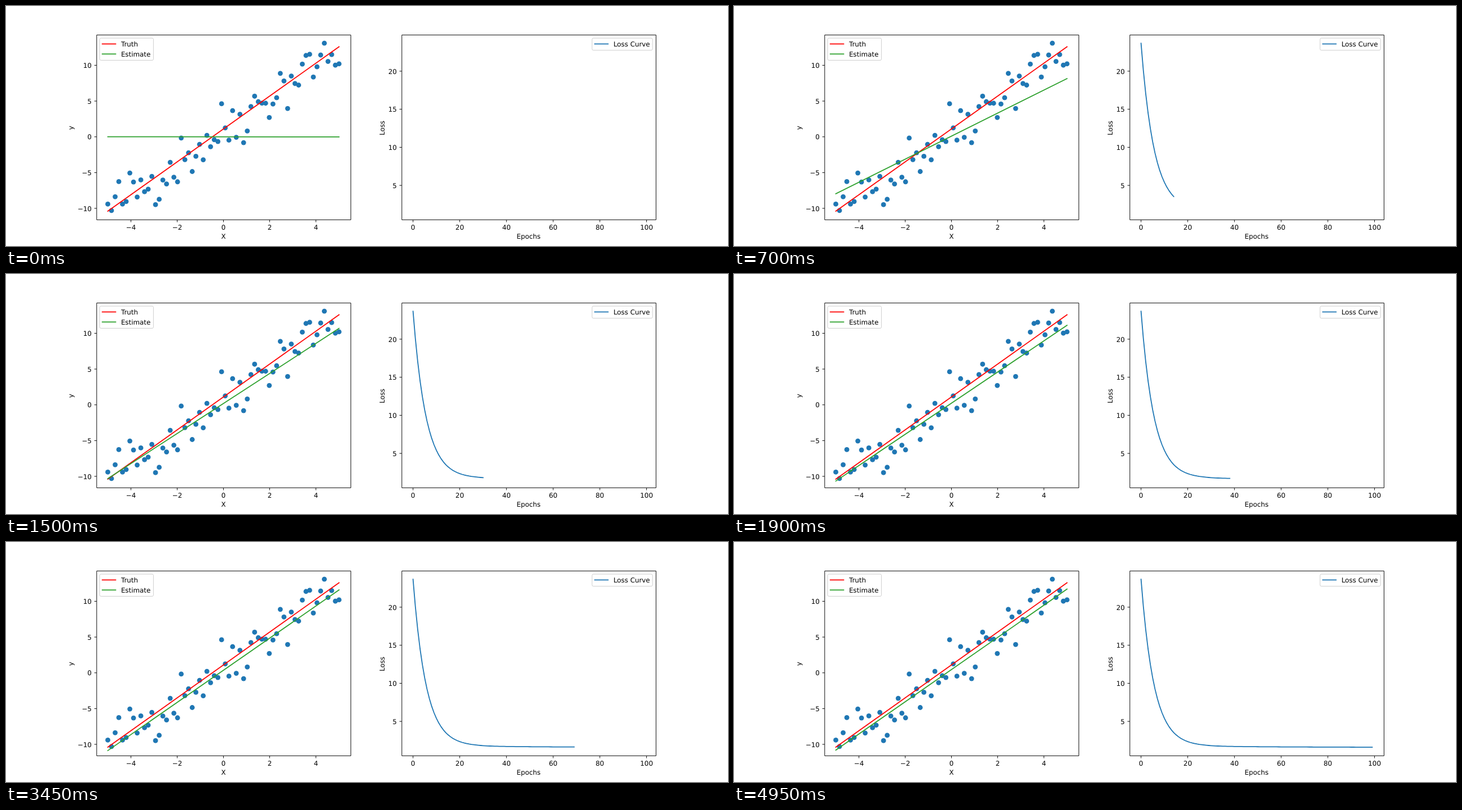
Animation of 1280 by 427 pixels, one loop 5000 ms. Source, as an HTML page:

```html
<!DOCTYPE html>
<html lang="en">
<head>
<meta charset="utf-8">
<title>Linear regression by gradient descent</title>
<style>
  html, body { margin: 0; width: 100%; height: 100%; overflow: hidden; background: #fff; }
  svg { display: block; }
  text { font: 11.85px "DejaVu Sans", sans-serif; text-rendering: geometricPrecision; }
  .axis { fill: none; stroke: #000; stroke-width: .95; }
  .line { fill: none; stroke-width: 1.78; stroke-linecap: square; stroke-linejoin: round; }
  .legend { fill: #fff; stroke: #ccc; stroke-width: .95; }
</style>
</head>
<body>
<svg id="stage" width="1280" height="427" viewBox="0 0 1280 427"></svg>
<script>
const BLUE = '#1f77b4', RED = '#ff0000', GREEN = '#2ca02c';
const TOP = 51.6, BOTTOM = 380.4;
const DATA_TOP = 66.19, DATA_BOTTOM = 365.09;
const STEP = 50, EPOCHS = 100, COUNT = 64, RATE = 0.01;
const SLOPE = 2.3, BIAS = 1.1, SPREAD = 2;
const stage = document.getElementById('stage');

const mean = list => list.reduce((sum, v) => sum + v, 0) / list.length;

// Mersenne Twister: uniform numbers in [0, 1) with 53 bits
function twister(seed) {
  const size = 624, state = new Uint32Array(size);
  state[0] = seed;
  for (let i = 1; i < size; i++) {
    const prev = state[i - 1] ^ (state[i - 1] >>> 30);
    state[i] = Math.imul(1812433253, prev) + i;
  }
  let pos = 0;
  function word() {
    const next = (pos + 1) % size;
    const mix = (state[pos] & 0x80000000) | (state[next] & 0x7fffffff);
    state[pos] = state[(pos + 397) % size] ^ (mix >>> 1) ^ (mix & 1 ? 0x9908b0df : 0);
    let y = state[pos];
    pos = next;
    y ^= y >>> 11;
    y ^= (y << 7) & 0x9d2c5680;
    y ^= (y << 15) & 0xefc60000;
    return (y ^ (y >>> 18)) >>> 0;
  }
  return () => {
    const high = word() >>> 5, low = word() >>> 6;
    return (high * 2 ** 26 + low) / 2 ** 53;
  };
}

// Normal noise by the polar method, two values per accepted pair
function normals(count, random) {
  const out = [];
  while (out.length < count) {
    const a = 2 * random() - 1, b = 2 * random() - 1, r = a * a + b * b;
    if (r >= 1 || r === 0) continue;
    const f = Math.sqrt(-2 * Math.log(r) / r);
    out.push(f * b, f * a);
  }
  return out.slice(0, count);
}

const xs = Array.from({ length: COUNT }, (_, i) => -5 + 10 * i / (COUNT - 1));
const truth = xs.map(x => SLOPE * x + BIAS);
const noise = normals(COUNT, twister(42));
const ys = truth.map((y, i) => y + SPREAD * noise[i]);

// Gradient descent on half the mean squared error
const fits = [];
let w = -0.003, b = 0;
for (let e = 0; e < EPOCHS; e++) {
  const errors = xs.map((x, i) => w * x + b - ys[i]);
  fits.push({ w, b, loss: mean(errors.map(d => d * d)) / 2 });
  w -= RATE * mean(errors.map((d, i) => d * xs[i]));
  b -= RATE * mean(errors);
}

// Data to pixel scales
const scale = (a, b, from, to) => v => from + (to - from) * (v - a) / (b - a);
const heights = values => scale(Math.min(...values), Math.max(...values), DATA_BOTTOM, DATA_TOP);
const px = scale(-5, 5, 180.5, 590.4);
const py = heights([...ys, ...truth]);
const ex = scale(0, EPOCHS - 1, 721.6, 1131.5);
const ly = heights(fits.map(f => f.loss));

function add(tag, attrs, text) {
  const el = document.createElementNS('http://www.w3.org/2000/svg', tag);
  for (const name in attrs) el.setAttribute(name, attrs[name]);
  if (text !== undefined) el.textContent = text;
  stage.appendChild(el);
  return el;
}

function label(x, y, text, anchor = 'middle') {
  add('text', { x, y, 'text-anchor': anchor }, text);
}

function sideLabel(x, y, text) {
  add('text', { 'text-anchor': 'middle', transform: `translate(${x} ${y}) rotate(-90)` }, text);
}

function line(color, d = '') {
  return add('path', { class: 'line', stroke: color, d });
}

function straight(slope, bias) {
  return `M${px(-5)} ${py(bias - 5 * slope)}L${px(5)} ${py(bias + 5 * slope)}`;
}

const signed = n => String(n).replace('-', '\u2212');

function ticks(first, last, step, draw) {
  for (let t = first; t <= last; t += step) draw(t);
}

function axes(left, right, xRange, xMap, yRange, yMap) {
  let d = `M${left} ${TOP}H${right}V${BOTTOM}H${left}Z`;
  ticks(...xRange, t => {
    d += `M${xMap(t)} ${BOTTOM}v4.2`;
    label(xMap(t), 398, signed(t));
  });
  ticks(...yRange, t => {
    d += `M${left} ${yMap(t)}h-4.2`;
    label(left - 8.9, yMap(t) + 4.65, signed(t), 'end');
  });
  add('path', { class: 'axis', d });
}

function legend(x, width, entries) {
  const row = 17.9;
  add('rect', { class: 'legend', x, y: 57.2, width, height: 3.6 + row * entries.length, rx: 2.4 });
  entries.forEach(([name, color], i) => {
    const y = 67.5 + row * i;
    line(color, `M${x + 4.7} ${y}h23.7`);
    label(x + 37.9, y + 4.2, name, 'start');
  });
}

xs.forEach((x, i) => add('circle', { cx: px(x), cy: py(ys[i]), r: 4.4, fill: BLUE }));
line(RED, straight(SLOPE, BIAS));
const estimate = line(GREEN);
const lossCurve = line(BLUE);

axes(160.8, 611.3, [-4, 4, 2], px, [-10, 10, 5], py);
axes(701.8, 1152.4, [0, 100, 20], ex, [5, 20, 5], ly);
label(385.5, 414.2, 'X');
label(926.4, 414.2, 'Epochs');
sideLabel(118.7, 216.8, 'y');
sideLabel(670.7, 217, 'Loss');
legend(166, 95.4, [['Truth', RED], ['Estimate', GREEN]]);
legend(1039, 107.2, [['Loss Curve', BLUE]]);

const curve = fits.map((f, e) => `${ex(e).toFixed(2)} ${ly(f.loss).toFixed(2)}`);

function draw(time) {
  const epoch = Math.floor(time / STEP) % EPOCHS;
  const fit = fits[epoch];
  estimate.setAttribute('d', straight(fit.w, fit.b));
  lossCurve.setAttribute('d', epoch ? 'M' + curve.slice(0, epoch + 1).join('L') : '');
}

let start;
function tick(now) {
  if (start === undefined) start = now;
  draw(now - start);
  requestAnimationFrame(tick);
}
draw(0);
requestAnimationFrame(tick);
</script>
</body>
</html>
```
